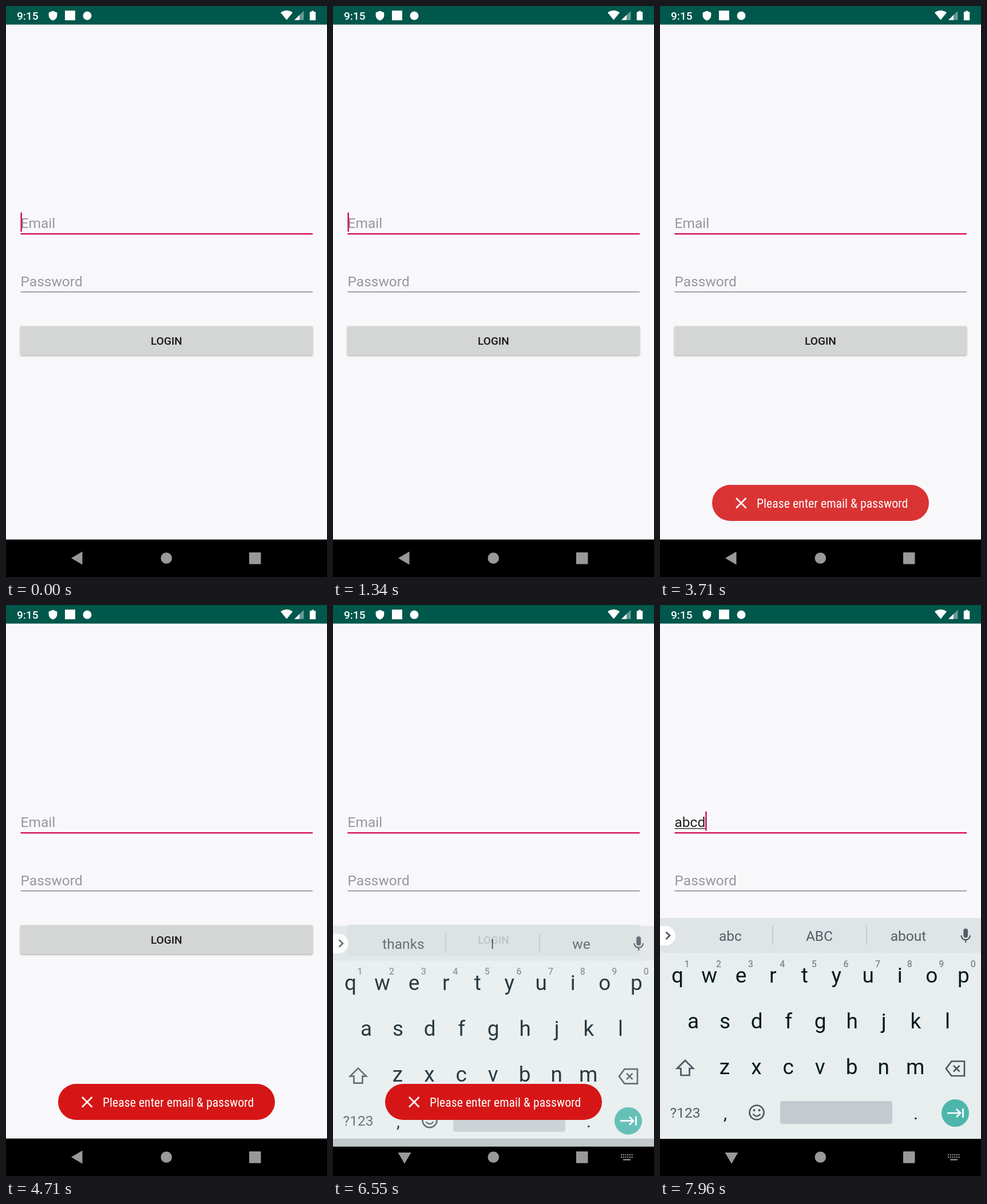
An HTML page that plays this animation: 561x998 px, repeating every 8000 ms.

```html
<!DOCTYPE html>
<html lang="en">
<head>
<meta charset="utf-8">
<title>Login form</title>
<style>
  html, body { margin: 0; width: 100%; height: 100%; overflow: hidden; background: #f8f8fb; }
  svg { display: block; width: 561px; height: 998px; font-family: Roboto, sans-serif; }
  .field { font-size: 24.5px; }
  .hint { fill: #98969e; }
  .label { font-size: 19.1px; font-weight: 500; }
  .mid { text-anchor: middle; }
  .key { font-size: 37px; fill: #04191f; }
  .digit { font-size: 16px; font-weight: 500; fill: #80898c; }
  .soft { font-size: 24.5px; fill: #525e66; }
  .line { fill: none; stroke: #4b5860; stroke-width: 2.7; }
  #toast text { font: 21.8px "Roboto Condensed", Roboto, sans-serif; font-stretch: 75%; fill: #fff; }
</style>
</head>
<body>
<svg viewBox="0 0 561 998">
  <defs>
    <filter id="shadow" x="-5%" y="-20%" width="110%" height="150%">
      <feDropShadow dx="0" dy="1.5" stdDeviation="1.5" flood-opacity=".3"/>
    </filter>
  </defs>
  <rect width="561" height="998" fill="#f8f8fb"/>

  <!-- Status bar -->
  <rect width="561" height="32.5" fill="#00574b"/>
  <g fill="#fff">
    <text class="label" x="19" y="24">9:15</text>
    <path d="M82 8.5l7.3 3v5c0 4.300-3 7.500-7.300 9-4.300-1.500-7.300-4.700-7.300-9v-5z"/>
    <rect x="103" y="8" width="18" height="17"/>
    <circle cx="142" cy="17" r="7.500"/>
    <path d="M490.500 24.500L480 11.500Q490.500 4 501 11.500z"/>
    <path d="M504 24.500L520.500 8.500v16z" opacity=".4"/>
    <path d="M504 24.500l9-8.700v8.700z"/>
    <path d="M534 8.500h4v1.700h3.200v14.800h-10.400v-14.800h3.200z"/>
  </g>

  <!-- Form -->
  <text class="field hint" id="emailHint" x="25.500" y="387.500">Email</text>
  <text class="field" id="email" x="25.500" y="387.500" fill="#222"></text>
  <rect id="composing" x="25.500" y="390" height="1.300" fill="#222"/>
  <rect x="25.500" y="397" width="510.500" height="2.500" fill="#d6165a"/>
  <rect id="cursor" y="361" width="2.600" height="33.500" fill="#d6165a"/>
  <text class="field hint" x="25.500" y="489.500">Password</text>
  <rect x="25.500" y="499" width="510.500" height="1.300" fill="#77757a"/>
  <rect x="25" y="559.500" width="511" height="50.500" rx="2" fill="#d4d6d5" filter="url(#shadow)"/>
  <text class="label mid" x="280.500" y="591.500" fill="#181818">LOGIN</text>

  <!-- Navigation bar -->
  <rect y="932.500" width="561" height="65.500"/>
  <g fill="#999">
    <path id="back" d="M114 965l19.500-11.500v23z"/>
    <g id="hide">
      <path d="M113.500 957h23l-11.500 19.500z"/>
      <path d="M503 961h21M503 965h21" stroke="#999" stroke-width="2.200" stroke-dasharray="2.200 1.500"/>
      <path d="M507 969.500h13" stroke="#999" stroke-width="2.200"/>
    </g>
    <circle cx="280.300" cy="965" r="9.800"/>
    <rect x="425" y="955" width="20.500" height="20.500" rx="1"/>
  </g>

  <g id="keyboard">
    <rect y="547" width="561" height="386" fill="#e8eeee"/>
    <rect y="547" width="561" height="61" fill="#dfe5e6"/>
    <path d="M0 561h10a17 17 0 0 1 0 34H0z" fill="#fff"/>
    <path class="line" d="M10.500 571.500l6.500 6.300-6.500 6.300"/>
    <path d="M197 561v33M361 561v33" stroke="#bcc4c6" stroke-width="1.500"/>
    <rect x="530.300" y="565.500" width="7.800" height="16" rx="3.900" fill="#525e66"/>
    <path d="M526.500 577.500a7.700 7.700 0 0 0 15.400 0M534.200 585v5" class="line" style="stroke-width:2.300"/>

    <path class="line" d="M44 796l14 14h-6.500v12h-15v-12H30z"/>
    <path class="line" d="M509.500 797.500h22.500v25.500h-22.500l-9.500-12.700zM513 805l10.500 10.500M523.500 805L513 815.500"/>
    <text class="soft mid" x="44" y="896">?123</text>
    <text class="key mid" x="114" y="899" style="font-size:30px">,</text>
    <text class="key mid" x="447" y="899" style="font-size:30px">.</text>
    <circle class="line" cx="169" cy="887" r="12.500"/>
    <path class="line" d="M162.500 889.500q6.500 8 13 0" style="stroke-width:2.200"/>
    <g fill="#4b5860"><circle cx="164.500" cy="883" r="2"/><circle cx="173.500" cy="883" r="2"/></g>
    <rect x="210" y="867" width="196" height="40" rx="4" fill="#c4cbd0"/>
    <circle cx="516" cy="888" r="24" fill="#4db6ac"/>
    <path d="M502 888h22M518 881l7 7-7 7M529.500 880v16" fill="none" stroke="#fff" stroke-width="2.700"/>
  </g>

  <g id="toast">
    <rect x="91" y="837" width="379" height="63" rx="31.500" fill="#d61616"/>
    <path d="M133 860l17.500 17.500M150.500 860L133 877.500" stroke="#fff" stroke-width="2.700"/>
    <text x="169" y="877">Please enter email &amp; password</text>
  </g>
</svg>
<script>
const LOOP = 8000;
const TOAST_IN = 3390, TOAST_OUT = 6890, TOAST_FADE = 500;
const TAP = 6020, KEYBOARD_IN = 6400, KEYBOARD_SLIDE = 250;
const KEY_TIMES = [7180, 7420, 7660, 7900];
const SUGGEST_DELAY = 90;

const el = id => document.getElementById(id);
const show = (id, on) => el(id).style.display = on ? '' : 'none';
const clamp = x => Math.min(1, Math.max(0, x));
const easeOut = x => 1 - (1 - clamp(x)) ** 2;

function addText(x, y, className, content) {
  const node = document.createElementNS('http://www.w3.org/2000/svg', 'text');
  node.setAttribute('x', x);
  node.setAttribute('y', y);
  node.setAttribute('class', className + ' mid');
  node.textContent = content;
  el('keyboard').append(node);
  return node;
}

[['qwertyuiop', 30.5, 659.5], ['asdfghjkl', 58, 739.5], ['zxcvbnm', 113, 819.5]].forEach(([row, x, y]) =>
  [...row].forEach((letter, i) => addText(x + i * 55.55, y, 'key', letter)));
[...'1234567890'].forEach((digit, i) => addText(47 + i * 55.6, 632.5, 'digit', digit));
const suggestions = [123, 278.5, 434].map(x => addText(x, 587, 'soft', ''));

function render(t) {
  const typed = KEY_TIMES.filter(k => t >= k).length;
  const email = el('email');
  email.textContent = 'abcd'.slice(0, typed);
  const width = typed ? email.getComputedTextLength() : 0;
  el('composing').setAttribute('width', width);
  show('emailHint', !typed);

  // The blink restarts on the tap and on every key
  const restart = [0, TAP, ...KEY_TIMES].filter(k => t >= k).pop();
  el('cursor').setAttribute('x', 25.4 + width);
  show('cursor', (t - restart) % 1000 < 510);

  const toast = easeOut((t - TOAST_IN) / TOAST_FADE) * (1 - clamp((t - TOAST_OUT) / TOAST_FADE));
  el('toast').setAttribute('opacity', toast);

  const open = easeOut((t - KEYBOARD_IN) / KEYBOARD_SLIDE);
  el('keyboard').setAttribute('opacity', open);
  el('keyboard').setAttribute('transform', `translate(0 ${87 * (1 - open)})`);
  show('back', !open);
  show('hide', open);

  const words = t >= KEY_TIMES[2] + SUGGEST_DELAY ? ['abc', 'ABC', 'about'] : ['thanks', 'I', 'we'];
  suggestions.forEach((node, i) => node.textContent = words[i]);
}

function frame() {
  render(performance.now() % LOOP);
  requestAnimationFrame(frame);
}
frame();
</script>
</body>
</html>
```
